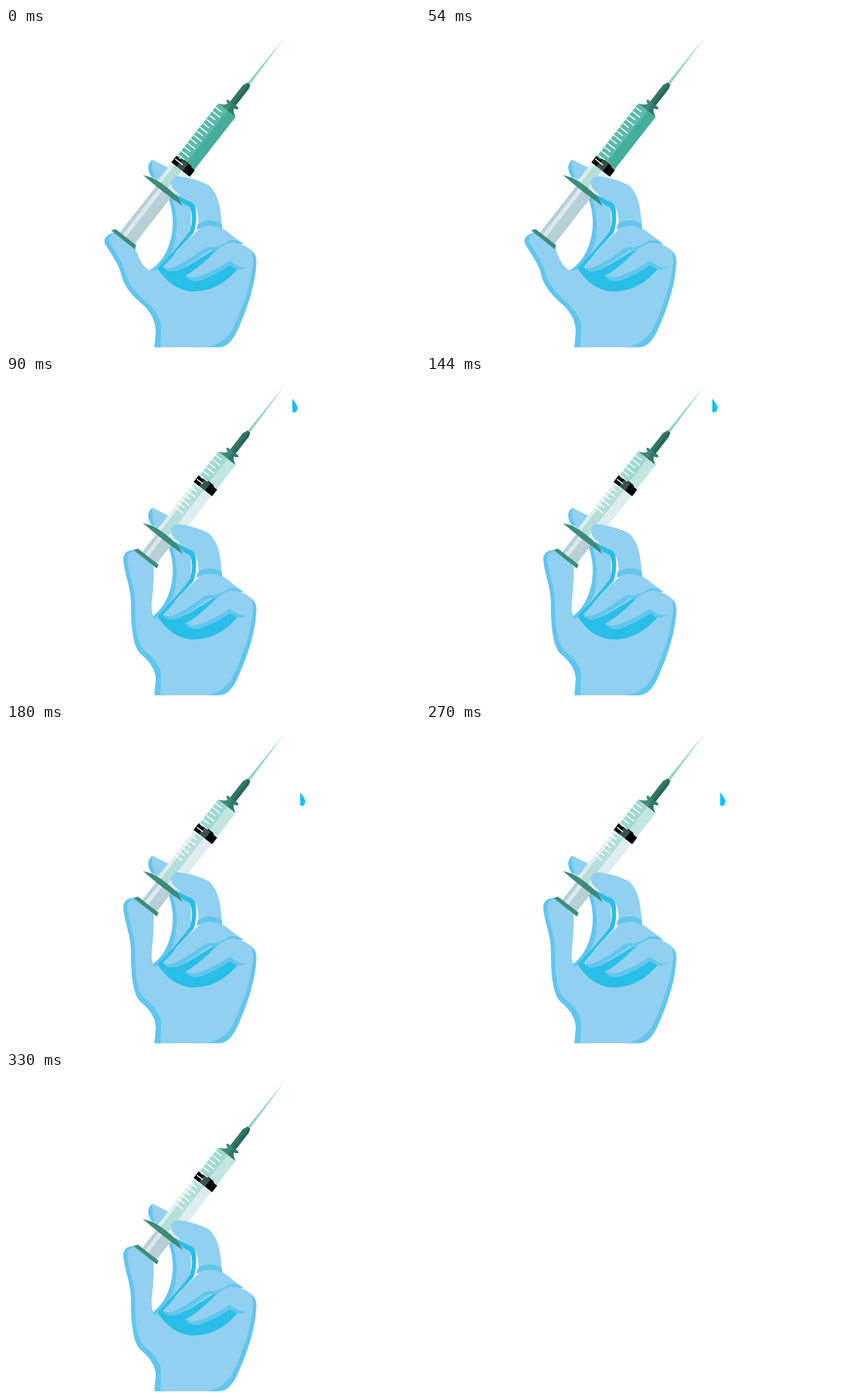
Recreate the animation shown at these times as an HTML page. Size 600x464 px, loop 0.36 s.

```html
<!DOCTYPE html>
<html lang="en">
<head>
<meta charset="utf-8">
<title>Syringe</title>
<style>
  html, body { margin: 0; width: 100%; height: 100%; overflow: hidden; background: #fff; }
  svg { display: block; width: 100%; height: 100%; }
  .light { fill: #91d0f0; }
  .mid { fill: #61c6ee; }
  .deep { fill: #29bee7; }
  .green { fill: #3d8b7b; }
  .pulled, .pushed, .drop, .plunger { animation: .36s step-end infinite; }
  .pulled { animation-name: pulled; }
  .pushed { animation-name: pushed; }
  .plunger { animation-name: push; }
  .drop { animation-name: drop; fill: #0fc1f6; }
  @keyframes pulled { 0% { visibility: visible } 25%, 100% { visibility: hidden } }
  @keyframes pushed { 0% { visibility: hidden } 25%, 100% { visibility: visible } }
  @keyframes push { 0% { transform: none } 25%, 100% { transform: translateY(-52.5px) } }
  @keyframes drop {
    0% { visibility: hidden; transform: none }
    25% { visibility: visible; transform: none }
    50% { visibility: visible; transform: translate(11.3px, 66px) }
    91.667%, 100% { visibility: hidden; transform: none }
  }
</style>
</head>
<body>
<svg viewBox="0 0 600 464">
  <!-- fingertip behind the barrel -->
  <path class="light" d="M212 191 L236 203 L222 223 L210 214 Q203 200 212 191Z"/>
  <path class="mid" d="M212 191 Q206 196 206 203 Q207 211 211 216 L217 217 Q210 207 212 191Z"/>

  <!-- middle finger -->
  <path class="mid" d="M234 244 C245 270 244 300 232 325 Q223 343 207 352 L222 353 L268 300 L262 248Z"/>
  <path class="light" d="M238 240 C250 268 250 300 240 324 Q231 342 215 353 L226 350 L268 297 L268 255Z"/>
  <path class="deep" d="M239 234 Q250 246 264 249 Q274 253 275 263 Q277 283 272 297 L240 331 L222 351 L219 349 Q249 318 267 294 Q272 274 267 260 Q250 254 239 234Z"/>

  <!-- palm and thumb, plunger drawn back -->
  <g class="pulled">
    <path class="mid" d="M158 296 Q140 301 143 312 C150 325 162 340 166 354 C170 375 184 389 199 402 C212 414 217 428 217 440 L215 463 H260 V370 L208 352 Q192 343 187 318Z"/>
    <path class="light" d="M160 297 Q147 301 149 309 C158 325 168 338 172 352 C176 370 188 384 203 397 C220 411 226 426 226 440 L224 463 H270 V370 L222 350 L208 352 Q194 343 187 317Z"/>
  </g>
  <!-- palm and thumb, plunger pressed -->
  <g class="pushed">
    <path class="mid" d="M188 252 Q169 252 170 267 C172 290 181 305 181 330 C181 365 184 392 195 403 C210 415 217 428 217 440 L215 463 H260 V370 L216 353 Q210 346 211 330 Q214 300 214 277Z"/>
    <path class="light" d="M190 253 Q174 254 176 268 C178 290 187 306 187 330 C187 362 189 387 201 398 C219 412 226 426 226 440 L224 463 H270 V370 L222 350 L216 353 Q210 346 211 330 Q214 300 214 276Z"/>
  </g>
  <path class="mid" d="M350 319 Q363 324 363 340 C361 375 349 408 337 435 Q325 463 309 463 H250 V380Z"/>
  <path class="light" d="M219 349 L345 318 Q360 325 358 342 C355 372 343 405 330 434 Q318 458 290 463 H224 L226 380Z"/>

  <!-- curled fingers -->
  <path class="deep" d="M220 349 L243 328 L278 312 L335 320 L337 348 C320 368 300 382 271 382 C247 381 231 366 220 349Z"/>
  <path class="light" d="M284 288 Q300 281 319 294 L344 313 L300 323 L275 338 Q250 354 237 353 Q230 351 228 346 L262 308Z"/>
  <path class="mid" d="M228 346 Q234 350 243 347 Q263 338 285 321 Q292 316 301 318 Q313 316 323 308 Q333 306 344 313 Q327 312 316 319 Q309 324 295 322 Q280 333 262 344 Q248 353 237 353 Q230 351 228 346Z"/>
  <path class="light" d="M260 359 Q278 349 297 330 Q314 312 329 311 Q347 313 358 325 L352 347 L335 348 L325 343 Q303 358 282 365 Q266 369 260 359Z"/>
  <path class="mid" d="M260 359 Q270 364 283 359 Q304 351 325 337 Q334 348 350 347 Q341 352 332 349 L325 344 Q303 359 282 366 Q266 370 260 359Z"/>

  <!-- syringe, drawn upright -->
  <g transform="translate(307.5 109.5) rotate(38)">
    <path d="M15 -48 L17 -133 L19.5 -48Z" fill="#95d3cc"/>
    <path d="M12 -12 V-43 L15 -50 H20 L22 -44 V-12Z" fill="#2a675b"/>
    <path d="M12 -12 V-43 L15 -50 H17 V-12Z" fill="#347668"/>
    <path class="green" d="M0 0 Q8 -3 11 -8 L6 -11 Q8 -15 12 -13 H22 Q26 -15 28 -11 L22 -8 Q25 -3 32 0Z"/>
    <path d="M17 -13 H22 Q26 -15 28 -11 L22 -8 Q25 -3 32 0 H17Z" fill="#33786a"/>

    <g class="plunger">
      <path d="M3 145 H30 V237 H3Z" fill="#b7d0d6"/>
      <path d="M8 145 H14 V237 H8Z" fill="#dce8ec"/>
      <path class="green" d="M-9 240.500 L-5 235 H33 L34.500 241Z"/>
    </g>

    <path d="M0 0 H32 V147 H0Z" fill="#dfedf0"/>
    <path d="M5 40 H18 V147 H5Z" fill="#b4dfd9"/>
    <g class="pulled">
      <path d="M0 0 H32 V100 H0Z" fill="#45ad9b"/>
      <path d="M0 0 H17 V100 H0Z" fill="#5cbaab"/>
    </g>
    <g class="pushed">
      <path d="M0 0 H32 V47 H0Z" fill="#c2e6e1"/>
      <path d="M0 0 H17 V47 H0Z" fill="#a0d9d1"/>
    </g>
    <g class="plunger">
      <path d="M-1 97 L6 98 L9 95 L24 95 L27 97 H33 V109 H-1Z"/>
      <path d="M9 96 H20 V109 H9Z" fill="#39504b"/>
    </g>
    <g fill="none" stroke="#fff">
      <path d="M6 6 V104" stroke-width="11" stroke-dasharray="1.600 13"/>
      <path d="M7.500 13.300 V104" stroke-width="14" stroke-dasharray="1.600 13"/>
    </g>
    <path class="green" d="M-22 149 L-9 143.500 Q14 139.500 39 143.500 L51 149 Q14 151 -22 149Z"/>
  </g>

  <!-- index finger in front -->
  <path class="light" d="M239 222 Q241 214 251 215 Q275 218 294 228 C308 240 312 263 313 293 L279 291 C280 272 277 258 268 252 Q254 248 248 239 Q238 231 239 222Z"/>
  <path class="mid" d="M278 284 Q295 274 313 284 V292 Q296 281 276 293Z"/>

  <path class="drop" d="M415 33 Q422.500 42 422.500 46.500 Q422 53 417 53 L415 52Z"/>
</svg>
</body>
</html>
```
